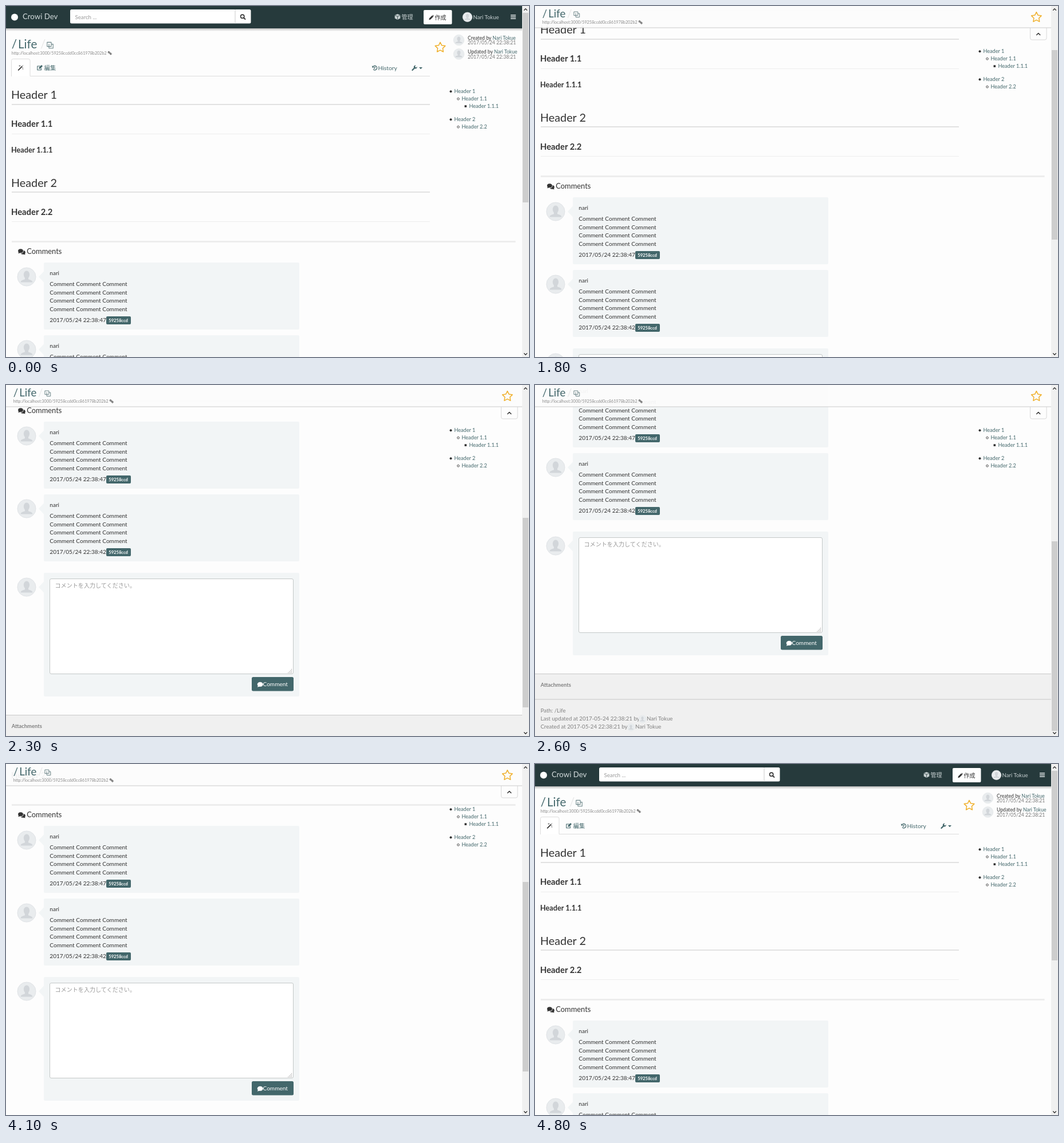
Recreate the animation shown at these times as an HTML page. Size 913 px wide and 613 px high, loop 5.8 s.

```html
<!DOCTYPE html>
<html lang="ja">
<head>
<meta charset="utf-8">
<title>Wiki page scroll</title>
<style>
html, body { margin: 0; width: 100%; height: 100%; overflow: hidden; background: #fdfdfd; }
svg { display: block; width: 913px; height: 613px; font-family: Lato, "Noto Sans CJK JP", sans-serif; }
text { white-space: pre; }
</style>
</head>
<body>
<svg id="stage" viewBox="0 0 913 613"></svg>
<script>
const MAIN = '#43676b', INK = '#333', NAV = '#263a3c', PALE = '#c6cfd0', GOLD = '#f0b02c';
const USER = 'Nari Tokue', LOGIN = 'nari';

// Drawing helpers
const text = (x, y, size, str, fill = INK, extra = '') =>
  `<text x="${x}" y="${y}" font-size="${size}" fill="${fill}" ${extra}>${str}</text>`;
const bold = (x, y, size, str, fill = INK) => text(x, y, size, str, fill, 'font-weight="700"');
const rect = (x, y, w, h, fill, extra = '') =>
  `<rect x="${x}" y="${y}" width="${w}" height="${h}" fill="${fill}" ${extra}/>`;
const path = (d, fill, extra = '') => `<path d="${d}" fill="${fill}" ${extra}/>`;
const line = (d, color, width = 1) =>
  path(d, 'none', `stroke="${color}" stroke-width="${width}" stroke-linecap="round" stroke-linejoin="round"`);
const at = (x, y, body, scale = 1) => `<g transform="translate(${x} ${y}) scale(${scale})">${body}</g>`;
const avatar = (x, y, r) => at(x, y, '<use href="#avatar"/>', r / 16.5);

// Icons, centred on 0,0
const icon = {
  search: `<circle cx="-.8" cy="-.8" r="3.1" fill="none" stroke="${INK}" stroke-width="1.6"/>` + line('M1.7 1.7L4 4', INK, 1.8),
  cube: path('M0-5L4.8-3V2.6L0 5L-4.8 2.6V-3Z', PALE) + line('M-4.2-2.6L0-.8L4.2-2.6M0-.8V4.2', NAV, .8),
  pencil: path('M-4.6 4.6L-4 1.6L1.6-4L4-1.6L-1.6 4ZM2.2-4.5L3-5L5-3L4.5-2.2Z', INK),
  bars: line('M-4-3H4M-4 0H4M-4 3H4', '#e8ecec', 1.4),
  copy: line('M-5.2-5.2H2V2H-5.2ZM-2-2V5.2H5.2V-2H2', '#6b8588', 1.1),
  link: line('M-.6.6L.8-.8M-.8-.8L-2.4-2.4M.8.8L2.4 2.4', '#555', .9) +
    '<g fill="none" stroke="#555" stroke-width="1"><circle cx="-1.6" cy="-1.3" r="1.4"/><circle cx="1.6" cy="1.3" r="1.4"/></g>',
  wand: line('M-3.8 3.8L2.2-2.2', INK, 1.8) + line('M3.4-3.6L4-4.2M-1-4V-3M4 0H3.2M-2.6-3.4H-2M4 2V2.4', INK, .9),
  edit: line('M2.4.8V3.8H-4.2V-3H.6', MAIN, 1.1) + path('M-1.8 1.6L-1.4-.6L3-5L5-3L.6 1.4Z', MAIN),
  history: line('M-3.1-2A3.7 3.7 0 1 1-2.6 2.8M0-1.8V.6H-1.6', MAIN, 1.2) + path('M-4.8-4V-.6H-1.4Z', MAIN),
  wrench: line('M-3.6 3.6L1 -1', MAIN, 2.2) + path('M4.6-2.6A3 3 0 1 1 2.4-4.7L.9-3L1.3-1.4L3-1Z', MAIN),
  star: line('M0-8.7L2.7-3.2L8.8-2.4L4.4 1.9L5.4 8L0 5.1L-5.4 8L-4.4 1.9L-8.8-2.4L-2.7-3.2Z', GOLD, 1.5),
  bubble: (c) => `<ellipse rx="5" ry="4" fill="${c}"/>` + path('M-3.6 1.6L-4.8 5L-.4 3.5Z', c),
};
icon.bubbles = at(2.4, 1.4, `<g transform="scale(-1 1)">${icon.bubble(INK)}</g>`, .82) +
  `<ellipse cx="-1.6" cy="-.9" rx="5" ry="4" fill="#fdfdfd"/>` + at(-1.8, -1.2, icon.bubble(INK), .88);

const chevron = (x, y, dir, w, width) => line(`M${x - w} ${y + dir * w / 2}L${x} ${y - dir * w / 2}L${x + w} ${y + dir * w / 2}`, INK, width);

const defs = `<defs>
  <linearGradient id="shade" x2="0" y2="1"><stop stop-color="#000" stop-opacity=".26"/><stop offset="1" stop-color="#000" stop-opacity="0"/></linearGradient>
  <g id="avatar"><circle r="16" fill="#e9ecee" stroke="#e0e3e6"/>
    <path d="M-10.5 9.5C-10 5.5-6 5.6-3 4.2V2C-7-3-5-10.5 0-10.5S7-3 3 2V4.2C6 5.6 10 5.5 10.5 9.5Z" fill="#d2d6da"/></g>
</defs>`;

const navbar = () =>
  rect(0, 39, 901, 5, 'url(#shade)') + rect(0, 0, 901, 39, NAV) +
  '<circle cx="15" cy="19.5" r="6" fill="#fff"/>' +
  text(29, 23, 13.2, 'Crowi Dev', PALE, 'font-weight="500"') +
  rect(112, 6, 315.5, 24.5, '#fff', 'rx="2.5"') + rect(399.5, 6, 1, 24.5, '#ccc') +
  text(120.5, 22.6, 9.7, 'Search ...', '#999') + at(413.5, 19, icon.search) +
  at(683.5, 19, icon.cube) + text(690.5, 22.8, 10.08, '管理', PALE) +
  rect(729, 7, 49.5, 25, '#fff', 'rx="2"') + at(742.5, 20, icon.pencil, .9) + text(748.5, 23.8, 10.08, '作成') +
  avatar(805.5, 19.3, 8.6) + text(815.5, 22.6, 9.6, USER, PALE) + at(885.5, 19, icon.bars);

const title = (x, y, size, gap, iconX, urlY) =>
  text(x, y, size, '/', MAIN) + text(x + gap, y, size, 'Life', MAIN) +
  text(iconX - 17, y, size, '/', '#e9e9e9') + at(iconX, y - 5.6, icon.copy, size / 20.6) +
  text(x, urlY, 7.2, 'http://localhost:3000/59258ccdd0cc861978b202b2', '#8c8c8c') +
  at(x + 171.5, urlY - 2.4, icon.link);

const credit = (y, verb) =>
  avatar(790.5, y + .5, 9.6) +
  text(806, y - .4, 8.64, `${verb} by <tspan fill="${MAIN}">${USER}</tspan>`) +
  text(806, y + 8.3, 8.64, '2017/05/24 22:38:21', '#777');

const pageHead = () =>
  title(9.7, 74.2, 20.6, 11.3, 77, 84.6) + at(758, 72, icon.star) + credit(59, 'Created') + credit(83.4, 'Updated');

const tabs = () =>
  rect(42, 122, 698, 1, '#ddd') + path('M9.5 123V95.5Q9.5 92.5 12.5 92.5H39Q42 92.5 42 95.5V122.5', '#fff', 'stroke="#ddd"') +
  at(25.5, 108, icon.wand) + at(59, 108, icon.edit) + text(66.8, 111.8, 10.08, '編集', MAIN) +
  at(644, 108, icon.history) + text(649.5, 111.7, 10.3, 'History', MAIN) +
  at(713, 108.4, icon.wrench) + path('M721 107H727L724 110.2Z', MAIN);

const article = () =>
  text(9, 162.2, 19.8, 'Header 1') + rect(10, 171.5, 730, 1, '#c8c8c8') +
  bold(9, 211.2, 14.8, 'Header 1.1') + rect(10, 223, 730, 1, '#eee') +
  bold(9, 255.7, 12.7, 'Header 1.1.1') +
  text(9, 316, 19.8, 'Header 2') + rect(10, 324.5, 730, 1, '#c8c8c8') +
  bold(9, 364.7, 14.8, 'Header 2.2') + rect(10, 376, 730, 1, '#eee');

const toc = () => {
  const item = (x, y, str) => text(x, y + 3.2, 9.1, str, MAIN);
  const disc = (y) => `<circle cx="776.5" cy="${y}" r="2" fill="${INK}"/>`;
  const ring = (y) => `<circle cx="789.5" cy="${y}" r="1.8" fill="none" stroke="${INK}" stroke-width=".9"/>`;
  return disc(149.3) + item(782.5, 148.7, 'Header 1') + ring(162.2) + item(795.5, 161.7, 'Header 1.1') +
    rect(800.5, 173.3, 3.6, 3.6, INK) + item(808.5, 174.7, 'Header 1.1.1') +
    disc(198.3) + item(782.5, 197.7, 'Header 2') + ring(211.2) + item(795.5, 210.7, 'Header 2.2');
};

const panel = (y, h) =>
  avatar(36, y + 25, 16.5) + rect(66, y, 446, h, '#f2f5f6', 'rx="2"') + path(`M66.5 ${y + 15}V${y + 35}L57 ${y + 25}Z`, '#f2f5f6');

const comment = (y, time) =>
  panel(y, 117) + text(76.3, y + 21.5, 10.08, LOGIN) +
  [0, 1, 2, 3].map(i => text(76.3, y + 41 + i * 14.5, 10.08, 'Comment Comment Comment')).join('') +
  text(76.3, y + 104, 10.08, '2017/05/24 ' + time) +
  rect(175, y + 94, 43, 14, MAIN, 'rx="2"') + bold(179.3, y + 103.6, 7.6, '59258ccd', '#fff');

const comments = () =>
  rect(10, 410, 879.5, 3, '#ededed') + at(27.3, 429, icon.bubbles) + text(36.3, 433.4, 12.9, 'Comments') +
  comment(448, '22:38:47') + comment(575, '22:38:42') +
  panel(712, 216) + rect(76.5, 722.5, 425, 166, '#fff', 'rx="2.5" stroke="#c4c8c8"') +
  text(85.5, 738, 10.08, 'コメントを入力してください。', '#999') +
  path('M498 880h1v1h-1zM496 882h1v1h-1zM498 882h1v1h-1zM494 884h1v1h-1zM496 884h1v1h-1zM498 884h1v1h-1zM492 886h1v1h-1zM494 886h1v1h-1zM496 886h1v1h-1zM498 886h1v1h-1z', '#999') +
  rect(429, 894, 73, 24.5, MAIN, 'rx="2.5"') + at(443.7, 906.8, icon.bubble('#fff')) +
  text(448.5, 910.2, 10.08, 'Comment', '#fff');

const stamp = (y, verb, x) =>
  text(9.7, y, 9.65, `${verb} at 2017-05-24 22:38:21 by`, '#808080') +
  avatar(x, y - 2.4, 6.8) + text(x + 7.6, y, 9.65, USER, '#808080');

const footer = () =>
  rect(0, 960, 901, 120, '#f0f0f0') + rect(0, 960, 901, 1, '#c8c8c8') + rect(0, 1004.5, 901, 1, '#c8c8c8') +
  bold(9.7, 983.2, 9.4, 'Attachments', '#808080') +
  text(9.7, 1027.6, 9.65, 'Path: /Life', '#808080') +
  stamp(1041.8, 'Last updated', 187.5) + stamp(1056.2, 'Created', 167.5);

const fixedHead = () =>
  path('M864.5 38V56Q864.5 59 867.5 59H890Q893 59 893 56V38', '#fdfdfd', 'stroke="#d8d8d8"') +
  rect(0, 0, 901, 38, '#fcfcfc', 'fill-opacity=".95"') + rect(0, 37.5, 901, 1, '#ccc') +
  chevron(878.7, 49, 1, 3, 1.5) +
  title(12.7, 20.4, 18.6, 10.6, 73, 30.8) + at(875.3, 19.3, icon.star);

const scrollbar = () =>
  rect(901, 0, 12, 613, '#f0f0f0') + rect(902, 12, 10, 331, '#cdcdcd', 'id="thumb"') +
  chevron(907, 6, 1, 2.4, 1.3) + chevron(907, 608, -1, 2.4, 1.3);

const $ = id => document.getElementById(id);
$('stage').innerHTML = defs +
  `<g id="page">${article()}${comments()}${footer()}${tabs()}<g id="head">${pageHead()}</g>${navbar()}</g>` +
  `<g id="toc">${toc()}</g><g id="fixed">${fixedHead()}</g>` + scrollbar();

// Scroll offsets, one per 100 ms
const LOOP = 5800, STEP = 100, AFFIX = 70;
const runs = [
  { start: 1500, tops: [2, 28, 73, 114, 161, 209, 276, 335, 384, 424, 448, 456] },
  { start: 3800, tops: [451, 430, 393, 340, 282, 234, 162, 106, 58, 24, 0] },
];

function scrollAt(t) {
  let top = 0;
  for (const { start, tops } of runs) {
    if (t >= start) top = tops[Math.min(Math.floor((t - start) / STEP), tops.length - 1)];
  }
  return top;
}

function move(id, y) { $(id).setAttribute('transform', `translate(0 ${y})`); }
function show(id, on) { $(id).setAttribute('visibility', on ? 'visible' : 'hidden'); }

function draw() {
  const top = scrollAt(performance.now() % LOOP);
  const affixed = top >= AFFIX;
  move('page', -top);
  move('toc', -Math.min(top, AFFIX));
  move('thumb', Math.round(top * 0.572));
  show('head', !affixed);
  show('fixed', affixed);
  requestAnimationFrame(draw);
}
draw();
</script>
</body>
</html>
```
